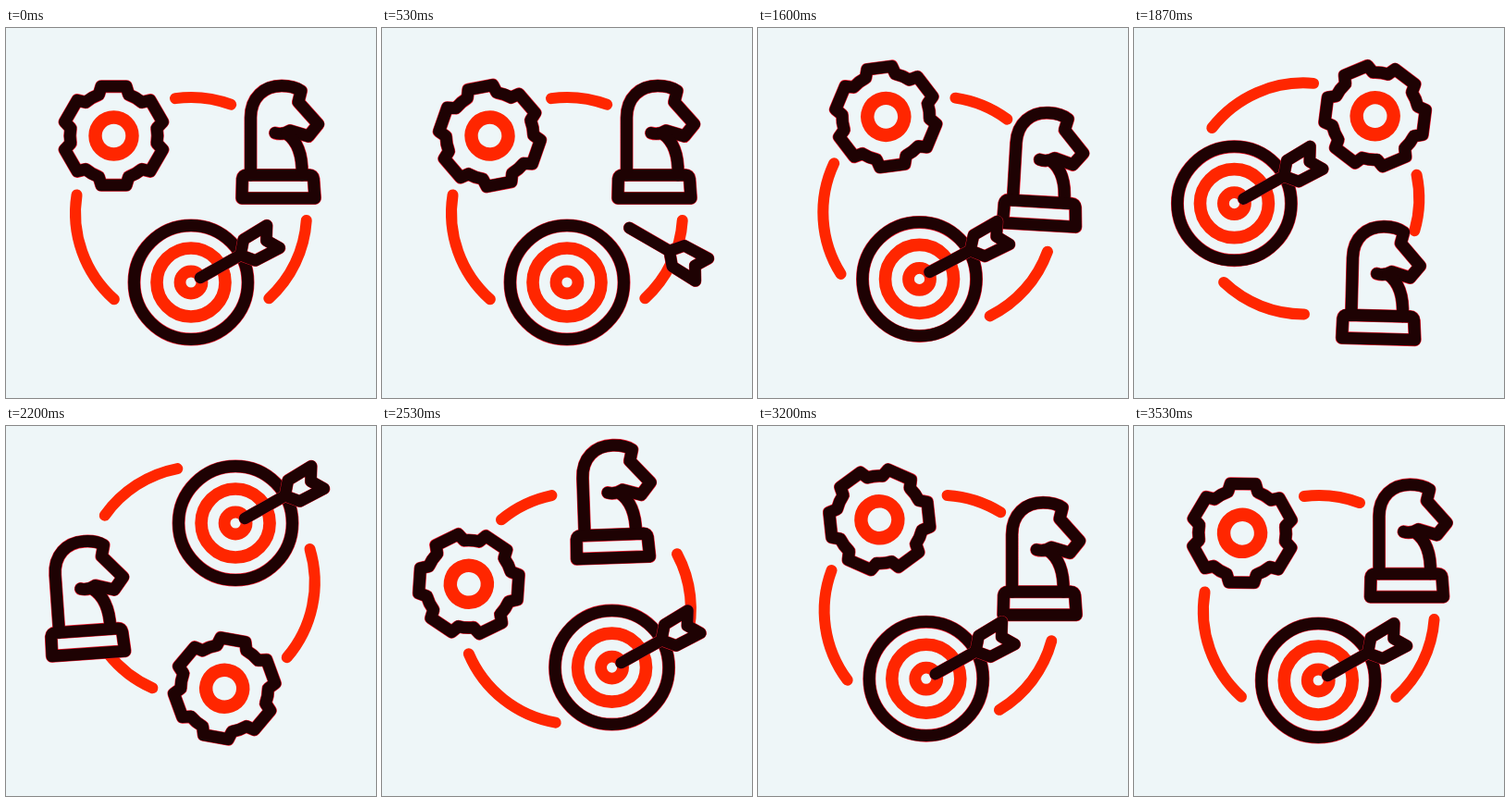
Animation of 400x400 px, one loop 3.6 s. Source, as an HTML page:

```html
<!DOCTYPE html>
<html lang="en">
<head>
<meta charset="utf-8">
<title>Strategy loop</title>
<style>
  html, body { margin: 0; width: 100%; height: 100%; overflow: hidden; background: #eef6f8; }
  svg { display: block; width: 100vw; height: 100vh; }
  .red { fill: none; stroke: #ff2600; }
  .edge { fill: #eef6f8; stroke: #f0152a; stroke-width: 14; }
  .ink { fill: none; stroke: #1e0203; stroke-width: 12.8; }
  #arrow .edge { stroke-width: 13.2; }
  #arrow .ink { stroke-width: 12.4; }
</style>
</head>
<body>
<svg viewBox="0 0 400 400" stroke-linecap="round" stroke-linejoin="round">
  <defs>
    <path id="cog"/>
    <g id="horse">
      <path d="M264.5 159V97C264.5 75 279 62.5 298 62.5C307 62.5 314 64.5 319 68L316 80L337.5 104L327 117L307 111Q299 116 291 113.5"/>
      <path d="M303 114Q321 126 320 159"/>
      <path d="M260 159H328Q332 159 332.5 163L334 184H255L255.5 163Q256 159 260 159Z"/>
    </g>
    <circle id="rim" cx="200" cy="275" r="61.5"/>
    <path id="dart" d="M0 0H50L61 -13L90.5 -14L82 0L90.5 14L61 13L50 0"/>
  </defs>
  <g id="wheel">
    <g class="red" stroke-width="12" id="arcs"></g>
    <g id="gear">
      <use href="#cog" class="edge"/>
      <use href="#cog" class="ink"/>
      <circle class="red" r="20" stroke-width="14.4"/>
    </g>
    <g id="knight">
      <use href="#horse" class="edge"/>
      <use href="#horse" class="ink"/>
    </g>
    <g id="target">
      <use href="#rim" class="edge"/>
      <use href="#rim" class="ink"/>
      <circle class="red" cx="200" cy="275" r="37" stroke-width="13.6"/>
      <circle class="red" cx="200" cy="275" r="12" stroke-width="12.8"/>
      <g id="arrow">
        <g transform="translate(210 270) rotate(-29.4)">
          <use href="#dart" class="edge"/>
          <use href="#dart" class="ink"/>
        </g>
      </g>
    </g>
  </g>
</svg>
<script>
const LOOP = 3600, STEPS = 54;
const $ = id => document.getElementById(id);
const put = (id, transform) => $(id).setAttribute('transform', transform);
const polar = (cx, cy, r, deg) => {
  const a = deg * Math.PI / 180;
  return `${(cx + r * Math.cos(a)).toFixed(2)} ${(cy + r * Math.sin(a)).toFixed(2)}`;
};

// Six teeth joined by short arcs
function cogPath() {
  const r = 47.3, root = 20, tip = 14.2, tipR = 55;
  let d = '';
  for (let i = 0; i < 6; i++) {
    const a = i * 60 - 90;
    d += (i ? `A${r} ${r} 0 0 1 ` : 'M') + polar(0, 0, r, a - root);
    d += 'L' + polar(0, 0, tipR, a - tip) + 'L' + polar(0, 0, tipR, a + tip);
    d += 'L' + polar(0, 0, r, a + root);
  }
  return d + `A${r} ${r} 0 0 1 ${polar(0, 0, r, -90 - root)}Z`;
}
$('cog').setAttribute('d', cogPath());

$('arcs').innerHTML = [[131.7, 189], [262.2, 290.2], [3.7, 47.6]].map(([a, b]) =>
  `<path d="M${polar(200, 200, 125, a)}A125 125 0 0 1 ${polar(200, 200, 125, b)}"/>`).join('');

const smooth = u => u * u * (3 - 2 * u);

// Eased value at t through [time, value] keys
function track(t, keys) {
  if (t <= keys[0][0]) return keys[0][1];
  for (let i = 1; i < keys.length; i++) {
    const [t0, v0] = keys[i - 1], [t1, v1] = keys[i];
    if (t < t1) return v0 + (v1 - v0) * smooth((t - t0) / (t1 - t0));
  }
  return keys[keys.length - 1][1];
}

// cubic-bezier(a, 0, b, 1)
function bezier(x, a, b) {
  let lo = 0, hi = 1;
  for (let i = 0; i < 24; i++) {
    const p = (lo + hi) / 2, q = 1 - p;
    if (3 * a * p * q * q + 3 * b * p * p * q + p * p * p < x) lo = p; else hi = p;
  }
  return smooth(lo);
}

const TURN = [[1420, 0], [2870, 380], [3600, 360]];
const ROCK = [[533, 0], [1200, -8.2], [1667, 4], [2200, -4], [2867, 0]];
const SHOT = [[0, 0], [600, 1], [920, 1], [1667, 0]];

function draw(t) {
  const turn = track(t, TURN), shot = track(t, SHOT);
  const bow = Math.sin(Math.PI * shot);
  put('wheel', `rotate(${turn} 200 183.2)`);
  put('gear', `translate(116.5 116.5) rotate(${-240 * bezier(t / LOOP, .39, .745)})`);
  put('knight', `rotate(${track(t, ROCK) - turn} 296 122.5)`);
  put('target', `rotate(${-turn} 200 275)`);
  put('arrow', `translate(${3.3 * bow} ${-9 * bow}) rotate(${61.5 * shot} 285 293.5)`);
}

const start = performance.now();
function tick() {
  const t = (performance.now() - start) % LOOP;
  // The motion advances in 15 poses per second
  draw(Math.floor(t * STEPS / LOOP + .07) % STEPS * LOOP / STEPS);
  requestAnimationFrame(tick);
}
tick();
</script>
</body>
</html>
```
